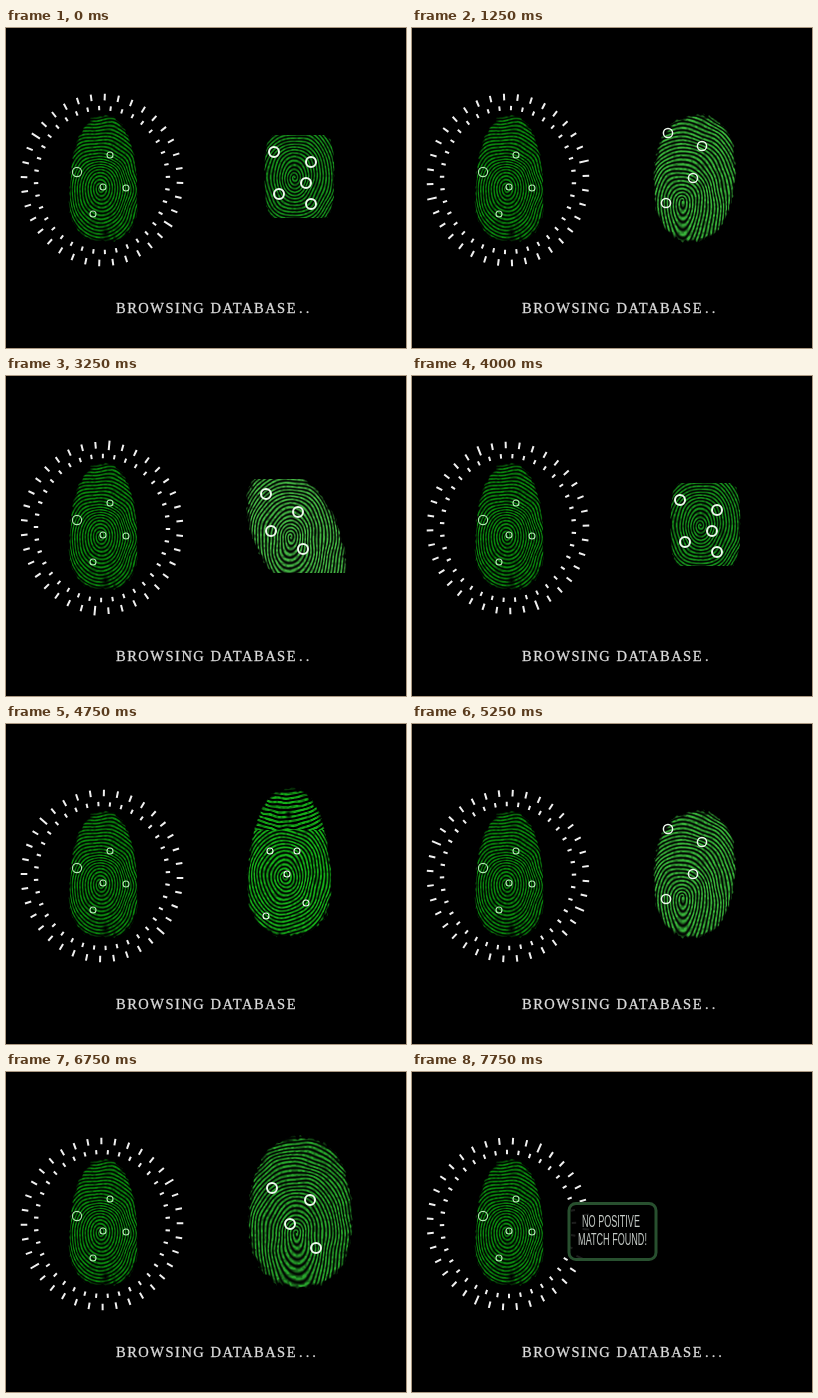
An HTML page with a canvas that plays this animation: 400 px wide and 320 px high, repeating every 8 s.

```html
<!DOCTYPE html>
<html lang="en">
<head>
<meta charset="utf-8">
<title>Fingerprint search</title>
<style>
html, body { margin: 0; width: 100%; height: 100%; overflow: hidden; background: #000; }
canvas, svg { position: absolute; left: 0; top: 0; width: 400px; height: 320px; }
.status { font: 14.5px "Liberation Serif", serif; letter-spacing: 1.5px; fill: #dcdcdc; stroke: #dcdcdc; stroke-width: .3px; }
.alert { font: 16.5px "Liberation Sans", sans-serif; fill: #c4cac6; }
#dots { letter-spacing: 3px; }
</style>
</head>
<body>
<canvas id="stage" width="400" height="320"></canvas>
<svg viewBox="0 0 400 320">
  <path id="ring" fill="none" stroke="#f0f0f0" stroke-width="2"/>
  <g id="popup">
    <rect x="157" y="131.5" width="87" height="56" rx="7" fill="#000" fill-opacity=".88" stroke="#28502f" stroke-width="3"/>
    <g class="alert" text-anchor="middle">
      <text transform="translate(199 155) scale(.55 1)">NO POSITIVE</text>
      <text transform="translate(200.500 172.500) scale(.55 1)">MATCH FOUND!</text>
    </g>
  </g>
  <text class="status" x="110" y="285">BROWSING DATABASE<tspan id="dots" dx="2"></tspan></text>
</svg>
<script>
const LOOP = 8000, STEP = 250, TAU = Math.PI * 2;
const $ = id => document.getElementById(id);
const ctx = $('stage').getContext('2d');
const clamp = v => Math.max(0, Math.min(1, v));

function hash(x, y) {
  let h = Math.imul(x, 374761393) + Math.imul(y, 668265263) | 0;
  h = Math.imul(h ^ h >>> 13, 1274126177);
  return ((h ^ h >>> 16) >>> 0) / 2 ** 32;
}

function noise(x, y) {
  const i = Math.floor(x), j = Math.floor(y), ease = t => t * t * (3 - 2 * t);
  const u = ease(x - i), v = ease(y - j);
  const row = n => hash(i, n) * (1 - u) + hash(i + 1, n) * u;
  return row(j) * (1 - v) + row(j + 1) * v;
}

// at/size: outline, core: ridge centre, legs: how fast ridges close below the core
const base = { pow: 2.3, skew: 0, taper: 0, top: 0, bottom: 320, legs: .8, gap: 2.8,
               rgb: [24, 150, 28], r: 5, line: 2 };
const prints = {
  left: { at: [97, 150], size: [34, 63], pow: 2.5, taper: .17, core: [94, 160], legs: .7, gap: 2.6,
          rgb: [10, 136, 14], notch: [99, 204], marks: [] },
  A: { at: [293, 148], size: [35, 46], pow: 4, top: 107, bottom: 190, core: [288, 149],
       rgb: [22, 145, 28], marks: [[268, 124], [305, 134], [300, 155], [273, 166], [305, 176]] },
  B: { at: [282, 150], size: [41, 64], skew: -.05, taper: -.04, core: [270, 172], legs: .4,
       gap: 3.1, rgb: [56, 180, 58], r: 4.6, line: 1.5,
       marks: [[256, 105], [290, 118], [281, 150], [254, 175]] },
  C: { at: [290, 153], size: [37, 55], skew: .06, core: [290, 150], speck: true,
       rgb: [46, 140, 50], marks: [[276, 125], [305, 149], [275, 165], [302, 181]] },
  D: { at: [290, 158], size: [45, 69], pow: 2, skew: .31, top: 103, bottom: 197, core: [284, 160],
       legs: .5, gap: 3, rgb: [68, 182, 68],
       marks: [[260, 118], [292, 136], [265, 155], [297, 173]] },
  E: { at: [283, 138], size: [41, 74], pow: 2.5, taper: .18, core: [278, 152], gap: 3, coarse: 106,
       rgb: [22, 178, 26], notch: [282, 90], r: 3, line: 1.1,
       marks: [[264, 127], [291, 127], [281, 150], [300, 179], [260, 192]] },
  F: { at: [284, 150], size: [31, 52], core: [278, 152], gap: 2.6, rgb: [18, 112, 24], fade: true,
       marks: [[268, 119], [298, 129], [280, 149], [298, 167], [280, 182]] },
  G: { at: [294, 140], size: [52, 76], taper: .05, core: [290, 160], legs: .4, gap: 3.2,
       rgb: [40, 165, 44], marks: [[266, 116], [304, 128], [284, 152], [310, 176]] }
};

function coverage(p, x, y) {
  const [cx, cy] = p.at, [w, h] = p.size;
  const dy = (y - cy) / h;
  const dx = (x - cx - p.skew * (y - cy)) / (w * (1 + p.taper * dy));
  const r = Math.abs(dx) ** p.pow + Math.abs(dy) ** p.pow;
  return [clamp((1 - r + (noise(x / 3, y / 3) - .5) * .16) * 8), r];
}

function ridge(p, x, y) {
  const u = x - p.core[0];
  let v = y - p.core[1];
  v *= v < 0 ? .8 : p.legs;
  const d = Math.hypot(u, v) + (noise(x / 18, y / 18) - .5) * 4 + p.gap * Math.atan2(v, u) / TAU;
  let a = .55 + .5 * Math.sin(TAU * d / p.gap);
  if (y < p.coarse) {
    const arch = y + u * u * .008 + noise(x / 8, y / 8) * 2;
    a = .55 + .8 * Math.sin(TAU * arch / 4.6);
  }
  a = clamp(a) * (.6 + .6 * noise(x / 2.2, y / 2.2));
  if (p.notch) a *= clamp(Math.hypot((x - p.notch[0]) * 1.5, y - p.notch[1]) / 6 - .1);
  if (p.fade) a *= clamp(1.5 * noise(x / 9, y / 9) + .35 - Math.max(0, x - 285) / 50);
  return a;
}

function render(spec) {
  const p = { ...base, ...spec };
  const layer = document.createElement('canvas');
  layer.width = 400;
  layer.height = 320;
  const g = layer.getContext('2d');
  const img = g.createImageData(400, 320);
  for (let y = p.top; y < p.bottom; y++) {
    for (let x = 0; x < 400; x++) {
      const [cover, r] = coverage(p, x, y);
      if (!cover) continue;
      let rgb = p.rgb, a = cover * ridge(p, x, y);
      if (p.speck) {
        const s = noise(x / 1.4, y / 1.4);
        a = cover * (.45 + .55 * hash(x, y));
        if (s > .74 - r * .2) rgb = [205, 228, 208];
        else if (s < .35) a *= .35;
      }
      img.data.set([...rgb, 255 * clamp(a)], (y * 400 + x) * 4);
    }
  }
  g.putImageData(img, 0, 0);
  p.marks.forEach(([x, y]) => mark(g, x, y, p.r, p.line, '#eefaee'));
  return layer;
}

function mark(g, x, y, r, line, color) {
  g.strokeStyle = color;
  g.lineWidth = line;
  g.beginPath();
  g.arc(x, y, r, 0, TAU);
  g.stroke();
}

const layers = {};
for (const id in prints) layers[id] = render(prints[id]);

// One character per step: print on the right ("-" none, "P" message) and trailing dots
const shown = 'AADDBBBGGCCCDDGGAAEEEBBFFCCGG-PP';
const dots = '23301233012312331230123301230123';
const leftMarks = [[71, 144, 4.6], [104, 127, 3], [97, 159, 3], [120, 160, 3], [87, 186, 3]];

function ticks(rx, ry, half, turn, step) {
  let d = '';
  for (let i = 0; i < 36; i++) {
    const deg = i * 10 + turn;
    // Two opposite ticks stand out and travel the other way
    const off = Math.abs(((deg - 122 + 9 * step) % 180 + 270) % 180 - 90);
    const len = half + (half > 3 && off < 5 ? 1.5 : 0);
    const s = Math.sin(deg * TAU / 360), c = -Math.cos(deg * TAU / 360);
    const point = k => (96 + s * (rx + k)).toFixed(2) + ' ' + (152 + c * (ry + k)).toFixed(2);
    d += 'M' + point(-len) + 'L' + point(len);
  }
  return d;
}

function draw(time) {
  const step = Math.floor(time % LOOP / STEP);
  const turn = step * 1.02;
  ctx.fillStyle = '#000';
  ctx.fillRect(0, 0, 400, 320);
  ctx.drawImage(layers.left, 0, 0);
  leftMarks.forEach(([x, y, r]) => mark(ctx, x, y, r, 1.1, '#b4e8b4'));
  const id = shown[step];
  if (layers[id]) ctx.drawImage(layers[id], 0, 0);
  $('ring').setAttribute('d', ticks(78, 83, 3.3, turn + 2, step) + ticks(66, 72, 2.2, turn - 2.5, step));
  $('popup').style.display = id === 'P' ? '' : 'none';
  $('dots').textContent = '.'.repeat(dots[step]);
}

function tick() {
  draw(performance.now());
  requestAnimationFrame(tick);
}
tick();
</script>
</body>
</html>
```
